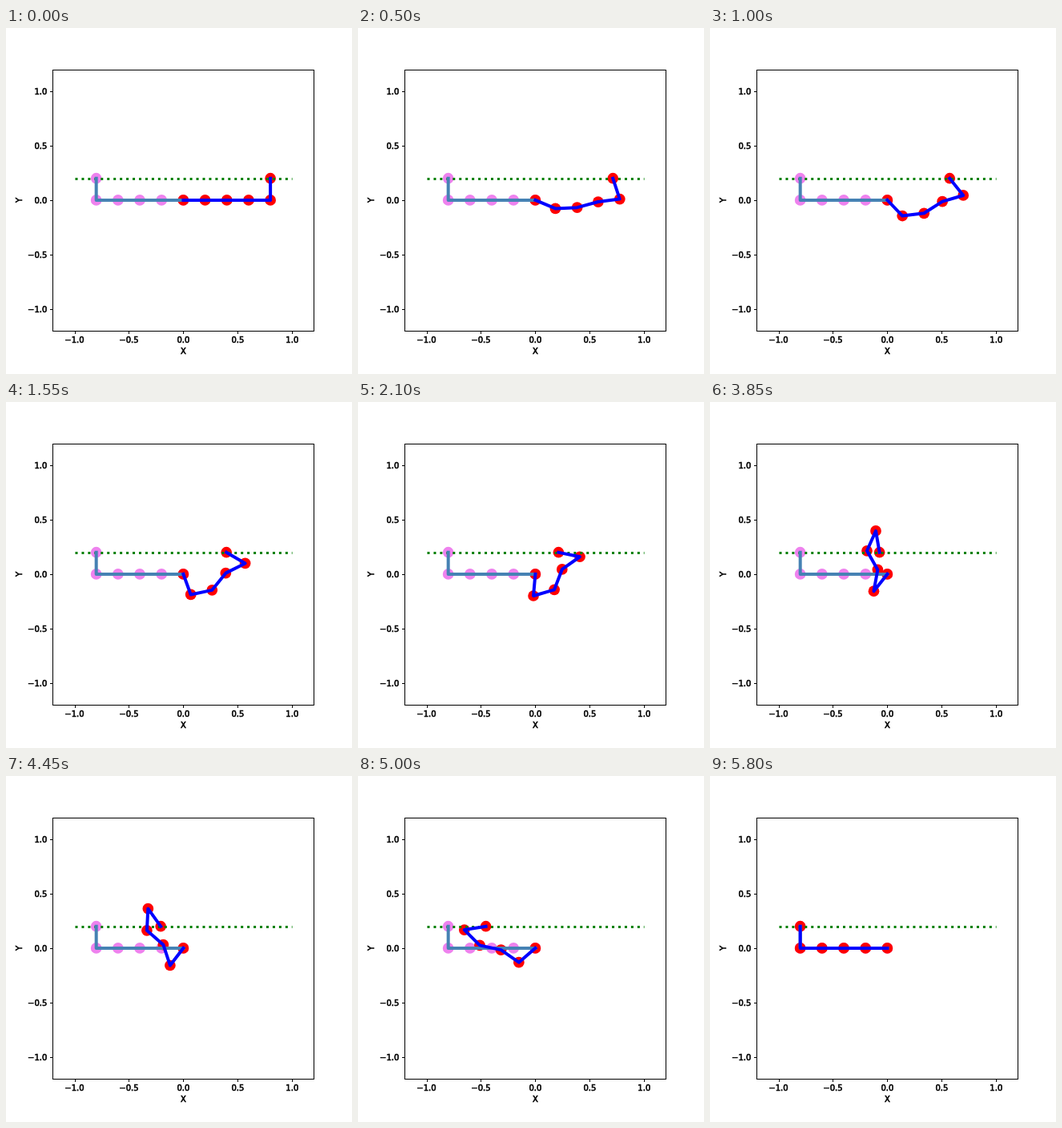
Write an HTML page that moves like this. It is 432 by 432 pixels and loops after 5.85 s.

```html
<!DOCTYPE html>
<html lang="en">
<head>
<meta charset="utf-8">
<title>Five-link arm on a line</title>
<style>
  html, body { margin: 0; width: 100%; height: 100%; overflow: hidden; background: #fff; }
  svg { display: block; width: 432px; height: 432px; }
  text { font: 10px "DejaVu Sans", sans-serif; stroke: #000; stroke-width: .6px; }
  polyline { fill: none; stroke-width: 4; stroke-linecap: square; stroke-linejoin: round; }
</style>
</head>
<body>
<svg viewBox="0 0 432 432">
  <g id="ghostDots" fill="violet"></g>
  <g id="armDots" fill="red"></g>
  <path d="M86.5 188.5H357.5" stroke="green" stroke-width="3" stroke-dasharray="3 4.95"/>
  <polyline id="ghost" stroke="steelblue"/>
  <polyline id="arm" stroke="blue"/>
  <g id="axes">
    <rect x="58.5" y="52.5" width="326" height="326" fill="none" stroke="#000"/>
    <text x="221.4" y="407" text-anchor="middle">X</text>
    <text transform="translate(19.7 215) rotate(-90)" text-anchor="middle">Y</text>
  </g>
</svg>
<script>
const CX = 221.4, CY = 214.92, UNIT = 135.9, LINK = 0.2 * UNIT;
const LOOP = 5850, STEP = 50;
const $ = id => document.getElementById(id);

function add(parent, tag, attrs, text = '') {
  const el = document.createElementNS('http://www.w3.org/2000/svg', tag);
  for (const k in attrs) el.setAttribute(k, attrs[k]);
  el.textContent = text;
  return parent.appendChild(el);
}

// Ticks and their labels
for (let v = -1; v <= 1; v += 0.5) {
  const label = v.toFixed(1).replace('-', '−');
  const x = CX + v * UNIT, y = CY - v * UNIT;
  const tx = Math.round(x) + 0.5, ty = Math.round(y) + 0.5;
  add($('axes'), 'path', { d: `M${tx} 378.5v3.5M58.5 ${ty}h-3.5`, stroke: '#000' });
  add($('axes'), 'text', { x, y: 393, 'text-anchor': 'middle' }, label);
  add($('axes'), 'text', { x: 51.3, y: Math.round(y + 3.8), 'text-anchor': 'end' }, label);
}

// Waypoints as relative joint angles
const pose = (...degrees) => degrees.map(d => d * Math.PI / 180);
const START = pose(0, 0, 0, 0, 90);
const FOLDED = pose(-156.6, 165, 79.4, -52.8, 163);
const RAISED = pose(-127, 211, 37.5, -53, 217);
const GOAL = pose(-180, 360, 0, 0, 270);

// The arm rests for one step at each waypoint
const LEGS = [
  { from: START, to: FOLDED, begin: 50, end: 3000, ease: u => u - 0.54 * u ** 3 * (1 - u) },
  { from: FOLDED, to: RAISED, begin: 3050, end: 3900, ease: u => u },
  { from: RAISED, to: GOAL, begin: 3950, end: 5800, ease: u => u ** 1.4 },
];

function jointsAt(t) {
  const { from, to, begin, end, ease } = LEGS.find(leg => t <= leg.end);
  const s = ease(Math.max(0, (t - begin) / (end - begin)));
  return from.map((a, i) => a + (to[i] - a) * s);
}

function headings(q) {
  let sum = 0;
  return q.map(v => sum += v);
}

// Newton steps that bring the tip back to one link length above the base
function project(q) {
  for (let n = 0; n < 6; n++) {
    const h = headings(q);
    const miss = 1 - h.reduce((s, a) => s + Math.sin(a), 0);
    const grad = h.map((_, i) => h.slice(i).reduce((s, a) => s + Math.cos(a), 0));
    const k = miss / grad.reduce((s, g) => s + g * g, 0);
    q = q.map((v, i) => v + k * grad[i]);
  }
  return q;
}

function chain(q) {
  let x = CX, y = CY;
  return [[x, y], ...headings(q).map(a => [x += LINK * Math.cos(a), y -= LINK * Math.sin(a)])];
}

const makeDots = group => Array.from({ length: 6 }, () => add(group, 'circle', { r: 6.87 }));

function show(dots, line, points) {
  dots.forEach((dot, i) => {
    dot.setAttribute('cx', points[i][0]);
    dot.setAttribute('cy', points[i][1]);
  });
  line.setAttribute('points', points);
}

const armDots = makeDots($('armDots'));
show(makeDots($('ghostDots')), $('ghost'), chain(GOAL));

function draw(now) {
  const t = Math.floor((now % LOOP) / STEP) * STEP;
  show(armDots, $('arm'), chain(project(jointsAt(t))));
  requestAnimationFrame(draw);
}
draw(0);
</script>
</body>
</html>
```
